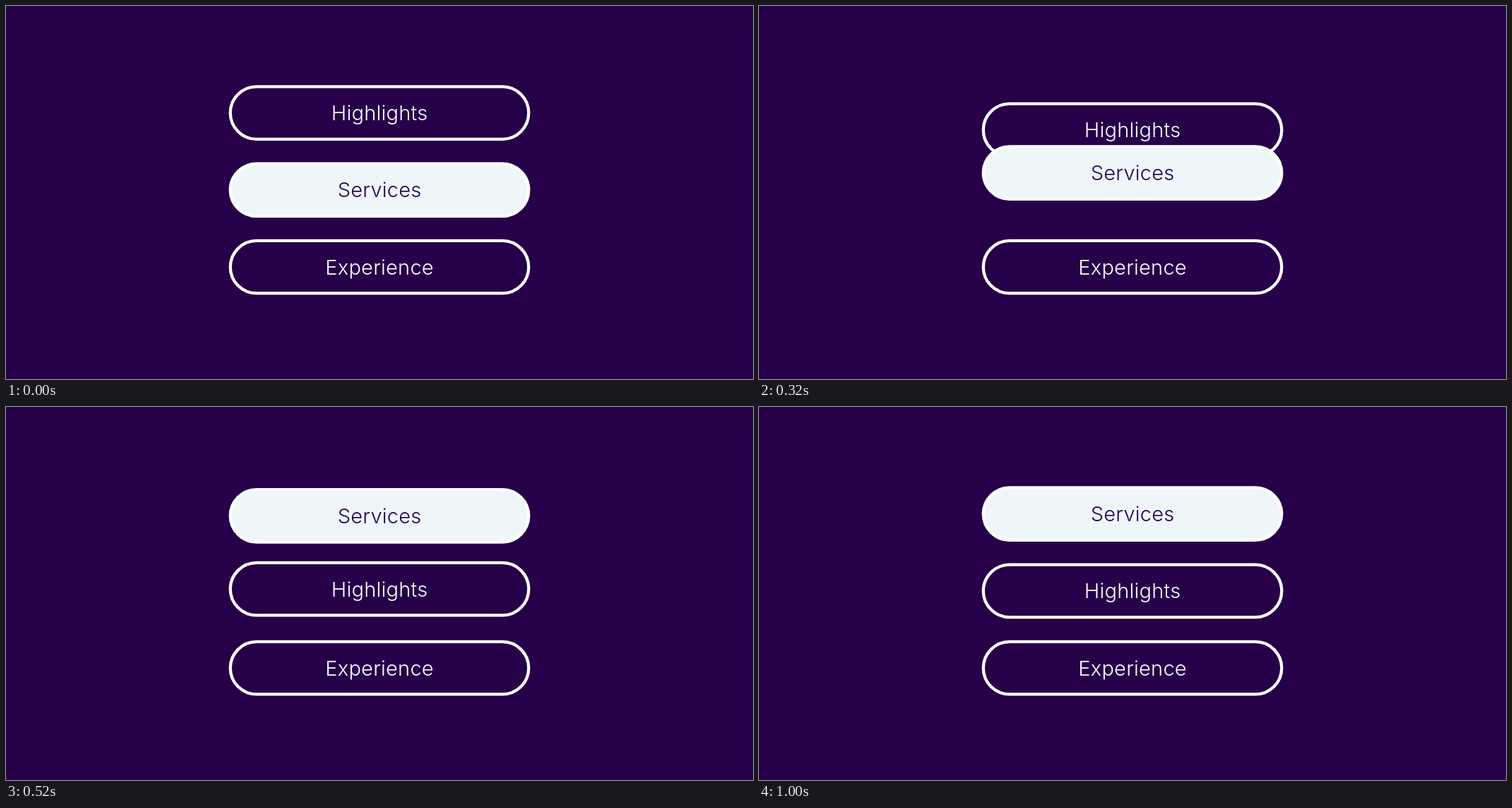
Animation, 1058 px wide and 529 px high, one loop 1.52 s. Source, as an HTML page:

```html
<!DOCTYPE html>
<html lang="en">
<head>
<meta charset="utf-8">
<title>Reordering buttons</title>
<style>
  html, body { margin: 0; width: 100%; height: 100%; overflow: hidden; background: #27004a; }
  svg { display: block; width: 100%; height: 100%; }
  rect { fill: none; stroke: #fff; stroke-width: 4.3px; }
  text { font: 300 29px Inter, sans-serif; letter-spacing: 0.25px; text-anchor: middle; fill: #fff; }
  .active rect { fill: #eef6fa; }
  .active text { fill: #27004a; }
</style>
</head>
<body>
<svg viewBox="0 0 1058 529"></svg>
<script>
const LOOP = 1520, STEP = 40;
const START = 16, DURATION = 613;
const TOP = 151.6, GAP = 109.3;
const svg = document.querySelector('svg');

function addButton(label, className = '') {
  svg.insertAdjacentHTML('beforeend', `
    <g class="${className}">
      <rect x="317.7" y="-37.25" width="422.6" height="74.5" rx="37.25"/>
      <text x="529.1" y="10.5">${label}</text>
    </g>`);
  return svg.lastElementChild;
}

const highlights = addButton('Highlights');
const experience = addButton('Experience');
const services = addButton('Services', 'active');

// Cubic Bezier easing with flat ends, solved by bisection.
function ease(x, x1 = 0.953, x2 = 0.239) {
  if (x <= 0 || x >= 1) return x <= 0 ? 0 : 1;
  let low = 0, high = 1, u;
  for (let i = 0; i < 24; i++) {
    u = (low + high) / 2;
    const v = 1 - u;
    const guess = 3 * u * v * v * x1 + 3 * u * u * v * x2 + u ** 3;
    if (guess < x) low = u; else high = u;
  }
  return u * u * (3 - 2 * u);
}

function place(button, slot) {
  button.setAttribute('transform', `translate(0 ${TOP + slot * GAP})`);
}

function draw(now) {
  const time = Math.floor((now % LOOP) / STEP) * STEP;
  const swap = ease((time - START) / DURATION);
  place(highlights, swap);
  place(services, 1 - swap);
  place(experience, 2);
}

const begin = performance.now();
function tick() {
  draw(performance.now() - begin);
  requestAnimationFrame(tick);
}
tick();
</script>
</body>
</html>
```
